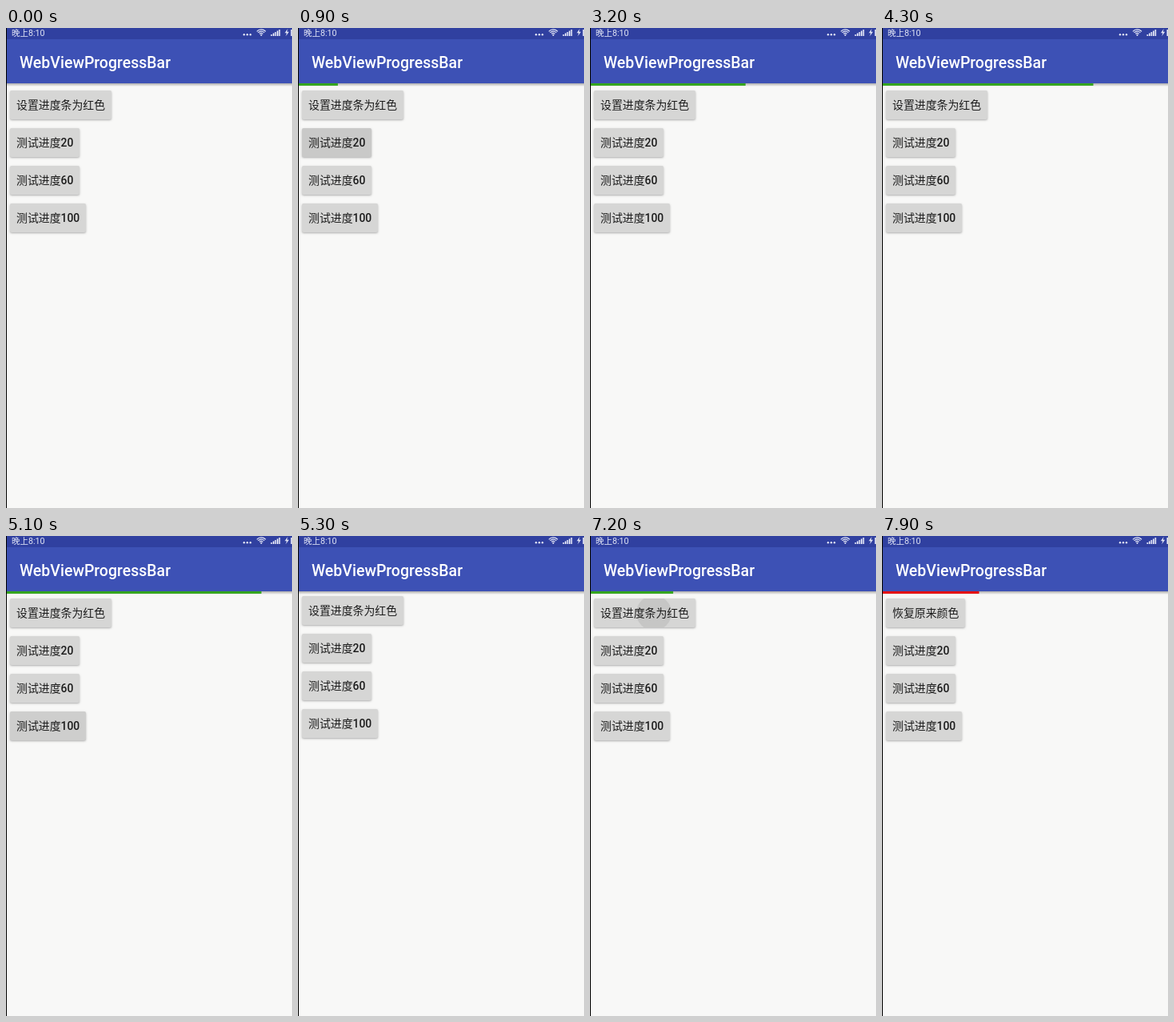
These frames come from a looping animation (358x599 px, 8000 ms). An HTML page with a canvas:

```html
<!DOCTYPE html>
<html lang="zh">
<head>
<meta charset="utf-8">
<title>WebViewProgressBar</title>
<style>
html, body { margin: 0; width: 100%; height: 100%; overflow: hidden; background: #f8f8f7; }
canvas { position: absolute; left: 0; top: 0; width: 358px; height: 599px; }
</style>
</head>
<body>
<canvas id="stage"></canvas>
<script>
const W = 358, H = 599, LOOP = 8000, STEP = 100;
const HIDE = 5300, SHOW = 6200, RECOLOR = 7400;
const LATIN = 'Roboto, sans-serif';
const HAN = '"Noto Sans CJK SC", "Noto Sans CJK", sans-serif';

// right edge of the bar: [time, x]
const FIRST = [[400, 1], [1300, 89], [2500, 117.3], [3700, 250], [4900, 279], [5200, 340]];
const SECOND = [[6200, 51], [6590, 89], [7900, 121.5]];
// [button, start, x]
const RIPPLES = [[1, 500, 60], [2, 2550, 60], [3, 4600, 62], [1, 6050, 78], [0, 7150, 80]];

const canvas = document.getElementById('stage');
const ctx = canvas.getContext('2d');
const dpr = window.devicePixelRatio || 1;
canvas.width = W * dpr;
canvas.height = H * dpr;
ctx.scale(dpr, dpr);

function rect(x, y, w, h, color) {
  ctx.fillStyle = color;
  ctx.fillRect(x, y, w, h);
}

function text(str, x, y, font, color) {
  ctx.font = font;
  ctx.fillStyle = color;
  ctx.fillText(str, x, y);
  return x + ctx.measureText(str).width;
}

function disc(x, y, r, color) {
  ctx.fillStyle = color;
  ctx.beginPath();
  ctx.arc(x, y, r, 0, Math.PI * 2);
  ctx.fill();
}

function along(keys, t) {
  for (let i = 1; i < keys.length; i++) {
    const [t0, x0] = keys[i - 1], [t1, x1] = keys[i];
    if (t <= t1) return x0 + (x1 - x0) * Math.max(0, t - t0) / (t1 - t0);
  }
  return keys[keys.length - 1][1];
}

function statusBar() {
  const ink = '#e3e6f6';
  rect(0, 0, W, 14, '#3040a0');
  const x = text('晚上', 7, 9.5, '400 10.5px ' + HAN, ink);
  text('8:10', x, 9.5, '400 10.7px ' + LATIN, ink);

  for (let i = 0; i < 3; i++) disc(298 + i * 4, 8.3, 1.2, ink);

  ctx.strokeStyle = ink;
  ctx.lineWidth = 1.2;
  for (const r of [3, 5.4, 7.6]) {
    ctx.beginPath();
    ctx.arc(319.5, 9.5, r, -Math.PI * 0.76, -Math.PI * 0.24);
    ctx.stroke();
  }
  disc(319.5, 8.8, 1.1, ink);

  for (let i = 0; i < 5; i++) rect(331.5 + i * 2.5, 8 - i * 1.5, 1.7, 2 + i * 1.5, ink);

  ctx.fillStyle = ink;
  ctx.beginPath();
  [[352.6, 1], [349, 6.2], [351.4, 6.2], [350.2, 10.2], [354.2, 4.8], [351.8, 4.8]]
    .forEach(([px, py]) => ctx.lineTo(px, py));
  ctx.fill();
  rect(356.5, 2, 1.5, 8, ink);
}

function appBar() {
  rect(0, 14, W, 55, '#3d51b5');
  text('WebViewProgressBar', 17, 50, '500 19.5px ' + LATIN, '#fff');
}

function appBarShadow() {
  const g = ctx.createLinearGradient(0, 69, 0, 73);
  g.addColorStop(0, 'rgba(0,0,0,.3)');
  g.addColorStop(1, 'rgba(0,0,0,0)');
  rect(0, 69, W, 4, g);
}

function ripple(start, x, y, t) {
  const age = t - start;
  if (age < 0 || age > 650 || (start > HIDE && t < SHOW)) return;
  const alpha = 0.075 * Math.min(1, (650 - age) / 300);
  disc(x, y, 10 + 0.24 * age, `rgba(0,0,0,${alpha})`);
}

function button(index, label, num, width, top, t) {
  const y = top + index * 47;
  ctx.save();
  ctx.beginPath();
  ctx.roundRect(5, y, width, 36, 2);
  ctx.shadowColor = 'rgba(0,0,0,.3)';
  ctx.shadowBlur = 2.5 * dpr;
  ctx.shadowOffsetY = dpr;
  ctx.fillStyle = '#d6d6d5';
  ctx.fill();
  ctx.shadowColor = 'transparent';
  ctx.clip();
  for (const [i, start, x] of RIPPLES) if (i === index) ripple(start, x, y + 18, t);
  ctx.restore();

  const x = text(label, 13, y + 23.2, '400 13.9px ' + HAN, '#1c1c1c');
  text(num, x, y + 23.2, '500 13.9px ' + LATIN, '#1c1c1c');
}

function draw(t) {
  const hidden = t >= HIDE && t < SHOW;
  const red = t >= RECOLOR;
  const top = hidden ? 75 : 78;

  rect(0, 0, W, H, '#f8f8f7');
  statusBar();
  appBar();
  appBarShadow();
  if (!hidden && t >= 500) {
    const end = along(t < SHOW ? FIRST : SECOND, t);
    rect(1, 69, end - 1, 3, red ? '#e40d0b' : '#35a51f');
  }

  if (red) button(0, '恢复原来颜色', '', 99, top, t);
  else button(0, '设置进度条为红色', '', 127, top, t);
  button(1, '测试进度', '20', 87, top, t);
  button(2, '测试进度', '60', 87, top, t);
  button(3, '测试进度', '100', 95, top, t);
  rect(0, 0, 1, H, '#000');
}

const origin = performance.now();
function tick() {
  const t = (performance.now() - origin) % LOOP;
  draw(Math.floor(t / STEP) * STEP);
  requestAnimationFrame(tick);
}
tick();
</script>
</body>
</html>
```
